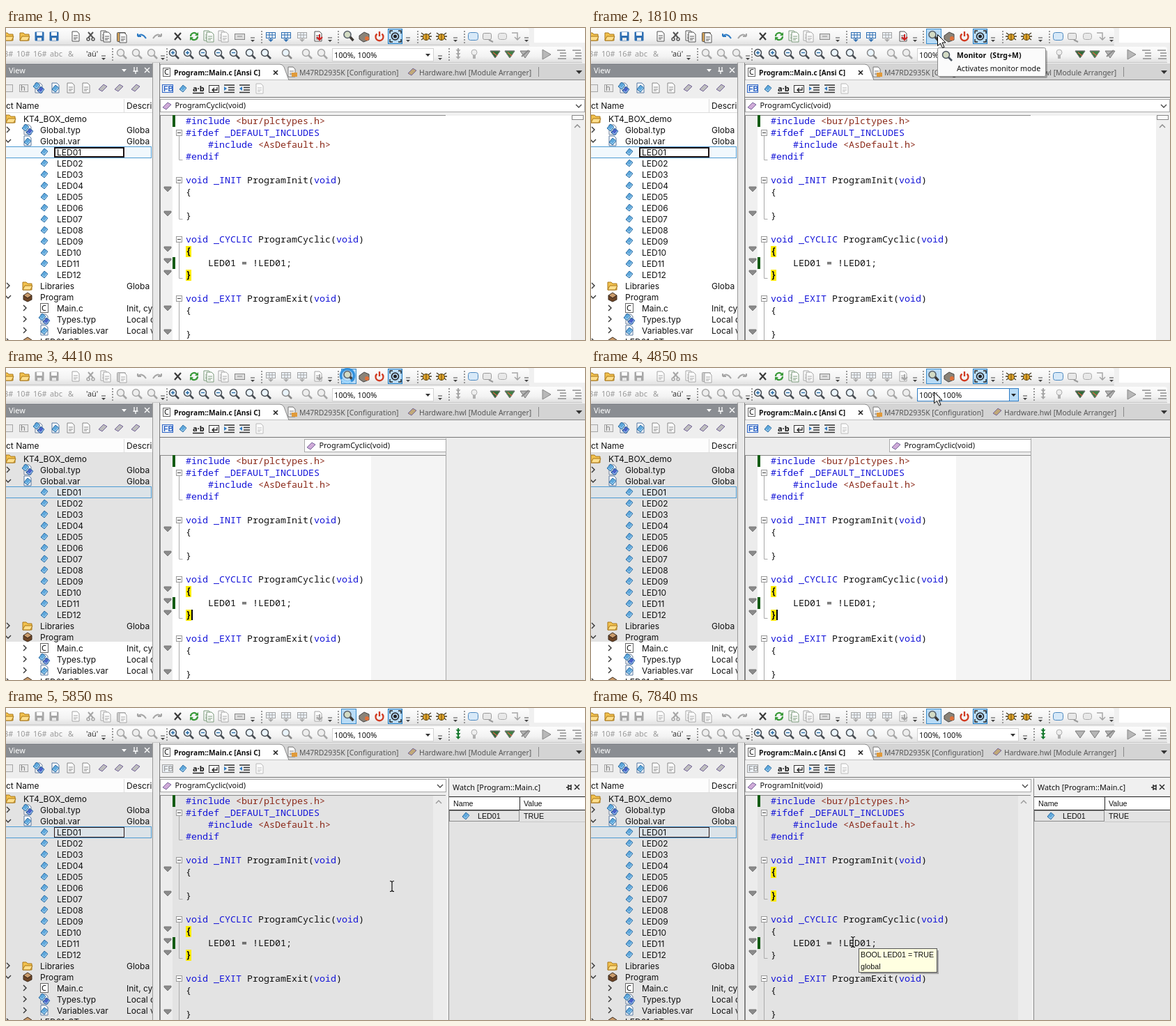
Animation, 831 px wide and 448 px high, one loop 8 s. Source, as an HTML page:

```html
<!DOCTYPE html>
<html lang="en">
<head>
<meta charset="utf-8">
<title>Monitor mode</title>
<style>
html, body { margin: 0; width: 100%; height: 100%; overflow: hidden; background: #f0f0f0; }
svg { display: block; }
text { white-space: pre; fill: #111; }
.ui { font: 10.9px "Noto Sans", sans-serif; }
.tab { font: 10.4px "Noto Sans", sans-serif; }
.tree { font: 12px Inter, sans-serif; }
.code { font: 13.33px "Noto Sans Mono", monospace; }
.sys { font: 10.7px "Liberation Sans", Arial, sans-serif; }
.bold { font-weight: 700; }
</style>
</head>
<body>
<script>
const T = 8000, NS = 'http://www.w3.org/2000/svg';
const BLUE = '#2f7cc4', DARK = '#444', GREY = '#a6a6a6', DIM = '#e3e3e3', SEL = '#b9dcf7';
let into = document.body;

function add(tag, attrs) {
  const n = document.createElementNS(NS, tag);
  for (const k in attrs) n.setAttribute(k, attrs[k]);
  return into.appendChild(n);
}
function group(fn, attrs = {}) {
  const g = add('g', attrs), keep = into;
  into = g; fn(); into = keep;
  return g;
}
const rect = (x, y, width, height, fill, stroke = 'none', rx = 0) =>
  add('rect', { x, y, width, height, fill, stroke, rx });
const box = (x, y, w, h, fill, stroke, rx) => rect(x + .5, y + .5, w - 1, h - 1, fill, stroke, rx);
const path = (d, fill, stroke = 'none', w = 1) => add('path', { d, fill, stroke, 'stroke-width': w });
const line = (d, c, w = 1) => path(d, 'none', c, w);
const disc = (cx, cy, r, fill, stroke = 'none', w = 1) =>
  add('circle', { cx, cy, r, fill, stroke, 'stroke-width': w });
function text(x, y, s, cls = 'ui', fill) {
  const n = add('text', { x, y, class: cls });
  if (fill) n.style.fill = fill;
  n.textContent = s;
  return n;
}

// Visible between each pair of times.
function on(node, ...times) {
  const k = [{ offset: 0, opacity: times[0] ? 0 : 1 }];
  times.forEach((t, i) => { if (t > 0 && t < T) k.push({ offset: t / T, opacity: i % 2 ? 0 : 1 }); });
  k.push({ offset: 1, opacity: k[k.length - 1].opacity });
  k.forEach(f => f.easing = 'step-end');
  play(node, k);
}
const play = (node, frames, duration = T) => node.animate(frames, { duration, iterations: Infinity });
const during = (times, fn) => on(group(fn), ...times);
const EDIT = [0, 3800], RUN = [3800, T], WIDE = [0, 4150], NARROW = [4150, T];
const MOVING = [4150, 5000], SETTLED = [5000, T];

// Small icons, centred on x, y.
const icon = {
  mag(x, y, c = DARK, lens = '#eaf4fc') {
    disc(x - 1.5, y - 1.5, 5, lens, c, 1.5);
    line(`M${x + 2} ${y + 2}l5 5`, c, 2.6);
  },
  folder(x, y) {
    path(`M${x - 7} ${y - 5}h5l2 2h6v9h-13z`, '#f2c14e', '#a87718');
    path(`M${x - 7} ${y + 6}l3-6h11l-3 6z`, '#ffdf8c', '#a87718');
  },
  disk(x, y, c) {
    box(x - 7, y - 7, 14, 14, c, 'none', 1);
    rect(x - 4, y - 6, 8, 5, '#fff');
    rect(x - 3, y + 2, 6, 4, '#e8e8e8');
  },
  doc(x, y, c = '#777', mark) {
    path(`M${x - 5} ${y - 7}h7l3 3v11h-10z`, '#fcfcfc', c);
    line(`M${x - 3} ${y - 1}h6m-6 3h6m-6 2h4`, mark || c);
  },
  copy(x, y, c) { icon.doc(x - 2, y - 1, c); icon.doc(x + 2, y + 1, c); },
  grid(x, y, c) {
    box(x - 7, y - 6, 14, 9, '#eef4fa', c);
    line(`M${x - 7} ${y - 2}h14m-9-4v9m4-9v9`, c);
    line(`M${x} ${y + 2}v5m-3-3l3 3 3-3`, c, 1.5);
  },
  undo(x, y, c, dir = 1) {
    line(`M${x - 6 * dir} ${y}q${6 * dir}-6 ${12 * dir} 3m${-12 * dir}-3v-4m0 4h${5 * dir}`, c, 2);
  },
  refresh(x, y, c) {
    line(`M${x - 5} ${y}a5 5 0 0 1 9-3m1 3a5 5 0 0 1-9 3`, c, 2.2);
    path(`M${x + 6} ${y - 6}v5h-5zM${x - 6} ${y + 6}v-5h5z`, c);
  },
  bug(x, y) {
    line(`M${x - 7} ${y - 5}l14 10m-14 0l14-10m-15 5h16`, '#443a20', 1.3);
    disc(x, y + 1, 4.6, '#dfa32b', '#5d4512');
    line(`M${x} ${y - 3}v9`, '#5d4512');
  },
  gem(x, y, c = '#5fa8dc') {
    path(`M${x - 5} ${y + 1}l5-6 5 4-5 6z`, c, '#2b6ca3');
    line(`M${x - 3} ${y + 1}l3 2.500 4-5`, '#b4dcf6');
  },
  more(x, y) {
    line(`M${x - 3} ${y - 2}h6`, DARK);
    path(`M${x - 3} ${y + 1}h6l-3 3z`, DARK);
  },
  grip(x, y) { add('path', { d: `M${x} ${y - 8}v18`, stroke: '#999', 'stroke-width': 2, 'stroke-dasharray': '2 2' }); },
  tri(x, y, c) { path(`M${x - 7} ${y - 5}h14l-7 10z`, c, '#777'); },
  cube(x, y) {
    path(`M${x - 6} ${y - 2}l6-4 6 4-6 4z`, '#c89a6a', '#3b2a1c');
    path(`M${x - 6} ${y - 2}v6l6 3 6-3v-6l-6 4z`, '#6d4526', '#3b2a1c');
  },
  types(x, y) {
    icon.doc(x, y, '#6a7c98');
    icon.gem(x - 3, y - 3); icon.gem(x + 3, y + 3, '#4a62c8');
  },
  vars(x, y) { icon.doc(x, y, '#5577a0'); icon.gem(x, y + 1); },
  pen(x, y, c) { path(`M${x - 6} ${y + 2}l7-7 5 3-7 7z`, c, '#75659a'); }
};

function toolbars() {
  rect(0, 0, 831, 50, '#f0f0f0');
  rect(758, 0, 73, 21, '#fff');
  [[0, 0, 755, 25], [0, 27, 831, 23]].forEach(([x, y, w, h]) => {
    rect(x - 4, y, w, h, 'url(#bar)', 'none', 4);
    line(`M${x} ${y + h - .5}h${w - 4}`, '#c6c6c6');
  });
  [367, 477, 591, 658].forEach(x => icon.grip(x, 12));
  [153, 231, 636].forEach(x => icon.grip(x, 37));
  [354, 465, 577, 645, 747].forEach(x => icon.more(x, 16));
  [140, 225, 623].forEach(x => icon.more(x, 42));

  icon.folder(4, 12); icon.folder(27, 12);
  const editIcons = live => {
    const c = live ? '#2f6fb2' : GREY, d = live ? '#555' : GREY;
    icon.disk(48, 12, c); icon.disk(69, 12, c);
    icon.doc(100, 12, d);
    line('M118 6l7 8m0-8l-7 8', d, 2); disc(118, 16, 2, 'none', d, 1.5); disc(125, 16, 2, 'none', d, 1.5);
    icon.copy(143, 12, d);
    box(159, 6, 13, 14, live ? '#d6a45a' : '#ccc', d, 1); icon.doc(168, 14, d);
    icon.undo(195, 12, live ? BLUE : GREY);
    [380, 402].forEach(x => icon.grid(x, 12, c));
    icon.grid(425, 12, GREY);
    icon.doc(448, 12, d); line('M450 9v8m-4-4l4 4 4-4', live ? '#c22' : GREY, 2);
  };
  during(EDIT, () => editIcons(true));
  during(RUN, () => editIcons(false));
  icon.undo(217, 12, GREY, -1);
  line('M242 7l9 10m0-10l-9 10', '#3a3a3a', 2.2);
  icon.refresh(270, 12, '#3a9a3a');
  icon.copy(291, 12, '#7a9a7a'); icon.copy(312, 12, GREY);
  box(328, 8, 15, 9, '#ddd', '#888'); line('M332 12h7', '#888');

  on(box(481, 1, 22, 22, SEL, '#3a8ccc'), 1150, T);
  disc(490, 9.5, 5, '#d3dbc4', '#59616b', 1.6); line('M494 13l4.500 5', '#3f3a36', 3.4);
  path('M507 11l7-5 7 3v8l-8 3-6-4z', '#8a8378', '#444'); disc(518, 15, 3, '#e0703a');
  line('M532.5 8.5a5.5 5.5 0 1 0 7 0M536 5v7', '#d03a20', 2.3);
  box(548, 1, 21, 22, SEL, '#1b78c2');
  disc(558.5, 12, 5, 'none', '#222', 1.5); disc(558.5, 12, 2.5, '#222');
  line('M551 8v-4h4m8 0h4v4m0 8v4h-4m-8 0h-4v-4', '#222', 1.4);
  icon.bug(603, 12); icon.bug(625, 12);
  box(663, 6, 15, 12, '#d7e9f8', '#4b88c0', 3);
  box(684, 7, 13, 10, '#e8e8e8', '#999', 2); line('M693 17l6 3', '#999', 2);
  box(706, 7, 13, 10, '#e8e8e8', '#aaa', 3); line('M726 7h8v9m-4-3l4 4 4-4', GREY, 1.5);

  [[-3, '8#'], [15, '10#'], [39, '16#'], [63, 'abc'], [89, '&']].forEach(([x, s]) => text(x, 41, s, 'ui', '#999'));
  text(115, 41, "'aü'", 'ui', '#333');
  [166, 188, 210, 432, 454].forEach(x => icon.mag(x, 37, GREY, '#eee'));
  [241, 262, 284, 306, 328, 351, 373, 403].forEach((x, i) => {
    icon.mag(x, 37, i == 7 ? '#888' : '#474c52');
    if (i < 2) line(`M${x - 4} 35.5h5m-2.5-2.5v5`, '#2468a4', 1.3);
    else if (i < 5) line(`M${x - 4} 35.5h5`, '#2468a4', 1.3);
  });
  box(468, 29, 146, 19, '#fff', '#d2d2d2');
  path('M602 37h7l-3.500 4z', '#333');
  during([880, 970, 4720, 5020], () => {
    box(468, 29, 146, 19, 'none', BLUE); box(600, 29, 14, 19, SEL, BLUE);
    path('M603 37h7l-3.500 4z', '#222');
  });
  text(471, 43, '100%, 100%');

  const signal = c => [32, 37, 42].forEach(y => path(`M645.500 ${y - 1}h7l-3.500 4zM648 ${y - 3}h2v2h-2z`, c));
  on(group(() => signal('#a8a8a8')), 0, 5200);
  on(group(() => signal('#187a30')), 5200, T);
  disc(672, 35, 4, '#eee', '#b0b0b0'); rect(670, 39, 4, 5, '#b0b0b0');
  [702, 723, 745].forEach(x => icon.tri(x, 38, '#b5b5b5'));
  during([0, 6000], () => { icon.tri(702, 38, '#2f6b35'); icon.tri(723, 38, '#3f8242'); line('M699 35l6 5m15-5l6 5', '#d8604a', 1.5); });
  line('M740 41l10-9', '#888', 2);
  path('M770 31l12 7-12 7z', '#b8b8b8', '#888');
  [798, 820].forEach(x => line(`M${x - 7} 32h12m-8 4h9m-9 4h9m-12 4h12`, '#8d8d8d', 1.4));
}

function treeRow(i, x, name, glyph, fold, desc) {
  const y = 130 + 16 * i;
  if (fold) {
    const fx = x > 60 ? 27 : 3;
    line(fold == '>' ? `M${fx - 2} ${y - 4}l4 4-4 4` : `M${fx - 4} ${y - 2}l4 4 4-4`, '#333', 1.4);
  }
  if (glyph) glyph(x - 18, y);
  text(x, y + 4.500, name, 'tree');
  if (desc) text(173, y + 4.500, desc, 'tree');
}

function treePanel() {
  rect(0, 50, 210, 398, '#fff');
  rect(0, 51, 210, 20, '#8a8d92');
  text(4, 65, 'View', 'ui', '#fff');
  path('M166 59h7l-3.500 4z', '#fff');
  line('M184 56v6m4-6v6m-5.500 0h7m-3.500 0v4m13-9l7 7m0-7l-7 7', '#fff', 1.3);
  rect(0, 71, 210, 30, '#eee');
  [3, 25].forEach(x => box(x - 6, 81, 13, 11, '#eaeaea', GREY));
  text(21, 90, 'h', 'ui', '#777');
  icon.types(47, 86); icon.vars(71, 86);
  [93, 115].forEach(x => icon.doc(x, 86, '#888'));
  [139, 162, 186].forEach(x => icon.pen(x, 86, '#bdbdbd'));
  on(rect(0, 122, 210, 271, DIM), ...RUN);
  on(rect(0, 393, 210, 55, DIM), ...SETTLED);
  rect(0, 101, 210, 21, '#fdfdfd');
  line('M0 121.500h210M169.500 102v19', '#ddd');
  text(0, 116, 'ct Name', 'tree'); text(173, 116, 'Descri', 'tree');

  box(-2, 170, 211, 17, 'rgba(200,228,248,.25)', '#4d9bd3');
  on(box(69, 171, 101, 15, 'none', '#2a1414'), 0, 4150, 5120, T);
  during(EDIT, () => box(70, 172, 99, 13, '#fff', '#111'));

  treeRow(0, 25, 'KT4_BOX_demo', icon.folder);
  treeRow(1, 49, 'Global.typ', icon.types, '>', 'Globa');
  treeRow(2, 49, 'Global.var', icon.vars, 'v', 'Globa');
  for (let n = 1; n < 13; n++) treeRow(n + 2, 73, 'LED' + String(n).padStart(2, 0), icon.gem);
  treeRow(15, 49, 'Libraries', icon.folder, '>', 'Globa');
  treeRow(16, 49, 'Program', icon.cube, 'v');
  treeRow(17, 73, 'Main.c', (x, y) => { box(x - 6, y - 7, 12, 14, '#fff', '#666'); text(x - 4, y + 4, 'C'); }, '>', 'Init, cy');
  treeRow(18, 73, 'Types.typ', icon.types, '>', 'Local d');
  treeRow(19, 73, 'Variables.var', icon.vars, '>', 'Local v');
  treeRow(20, 49, 'LED01_ST', icon.cube, '>');
}

function tabs() {
  rect(210, 50, 621, 398, '#f0f0f0');
  rect(211, 50, 8, 398, '#e8e8e8');
  line('M210.500 50v398', '#999');
  line('M220.500 50v398', '#777');
  rect(221, 51, 610, 23, '#d4d4d4');
  line('M221 74.500h610', '#8a8a8a');
  path('M221 75v-21q0-2 2-2h170q4 0 6 4l7 19z', '#fff', '#8a8a8a');
  box(225, 57, 11, 13, '#fff', '#666'); text(227, 67, 'C');
  text(241, 68, 'Program::Main.c [Ansi C]', 'ui bold').style.fontSize = '10.2px';
  line('M384 61l6 6m0-6l-6 6', '#222', 1.6);
  icon.doc(410, 63, '#777'); rect(410, 64, 8, 6, '#e09a3a');
  text(421, 68, 'M47RD2935K [Configuration]', 'tab', '#555');
  icon.pen(583, 63, '#c0a878');
  text(593, 68, 'Hardware.hwl [Module Arranger]', 'tab', '#555');
  line('M764.500 56v14', '#888');
  path('M818 61h9l-4.500 5z', '#333');
  rect(221, 75, 610, 24, '#f0f0f0');

  const fb = c => { box(224, 81, 16, 12, '#eef4fb', c); text(226, 91, 'FB', 'sys bold', c); };
  on(group(() => fb('#2b62c4')), 0, 5100);
  on(group(() => fb('#a0a0a0')), 5100, T);
  icon.gem(254, 87);
  text(268, 91, 'a·b', 'ui bold'); line('M268 93.500h16', '#222', 1.5);
  box(291, 82, 15, 11, '#fff', '#333'); line('M303 85v4h-7m3-3l-3 3 3 3', '#222', 1.3);
  [320, 342].forEach((x, i) => {
    line(`M${x - 7} 82h15m-9 3.500h9m-9 3.500h9m-15 3.500h15`, '#333', 1.4);
    path(i ? `M${x - 3} 84v6l-4-3z` : `M${x - 7} 84v6l4-3z`, BLUE);
  });
  icon.doc(364, 87, '#bbb');
}

function combo(x, right, name, arrow = true) {
  box(x, 102, right - x, 19, '#fff', '#a8a8a8');
  icon.pen(x + 10, 112, '#cfaad8');
  text(x + 21.500, 115, name);
  if (arrow) line(`M${right - 13} 110l4 4 4-4`, '#444', 1.3);
}

const rowY = i => 133 + 17 * i;
function code(i, ...parts) {
  const t = text(258, rowY(i) + 5, '', 'code');
  parts.forEach((s, n) => {
    const span = document.createElementNS(NS, 'tspan');
    span.textContent = s;
    span.style.fill = ['#1414d8', '#8b2a1a', '#111'][n];
    t.appendChild(span);
  });
}
function braces(...rows) {
  rows.forEach((i, n) => {
    rect(258, rowY(i) - 7, 8, 16, '#ffec00');
    text(258, rowY(i) + 5, n ? '}' : '{', 'code bold');
  });
}
const upArrow = x => line(`M${x - 4} 137l4-4 4 4`, '#999', 1.4);

function editor() {
  rect(222, 126, 17, 322, '#f0f0f0');
  during(WIDE, () => {
    combo(221, 831, 'ProgramCyclic(void)');
    rect(239, 126, 572, 322, '#fff');
    rect(811, 126, 19, 322, '#f0f0f0');
    box(812, 125, 17, 7, '#fafafa', '#888');
    line('M816 143l4-4 4 4', '#888', 1.4);
  });
  on(box(221, 102, 610, 19, 'none', BLUE), 640, 700);
  during(NARROW, () => rect(221, 99, 610, 349, '#ececec'));
  // The old picture stays in part until the layout settles.
  during(MOVING, () => {
    rect(239, 126, 285, 322, '#fff');
    rect(524, 126, 107, 322, '#f4f4f4');
    line('M631.500 101v347', '#aaa');
    combo(428, 632, 'ProgramCyclic(void)', false);
  });
  during(SETTLED, () => {
    rect(239, 126, 374, 322, DIM);
    rect(613, 126, 18, 322, '#ececec');
  });
  during([5000, 5960], () => combo(221, 632, 'ProgramCyclic(void)'));
  during([5960, T], () => combo(221, 632, 'ProgramInit(void)'));
  line('M221 99.500h610', '#777');
  line('M221 125.500h410M221.500 126v322', '#8a8a8a');
  [0, 12].forEach(i => rect(239, rowY(i) - 8, 4, 17, '#145c14'));

  [[1, 3], [5, 8], [10, 13], [15, 19]].forEach(([a, b]) => {
    line(`M248.500 ${rowY(a) + 5}V${rowY(b) + 5.500}h5`, '#aaa');
    box(244, rowY(a) - 4, 9, 9, '#fff', '#999');
    line(`M246 ${rowY(a) + .5}h5`, '#444');
  });
  [231, 266, 317, 334, 351, 402, 436].forEach(y => path(`M227 ${y - 3}h10v2l-5 5-5-5z`, '#8b8b8b', '#6d6d6d', .8));

  code(0, '#include ', '<bur/plctypes.h>');
  code(1, '#ifdef _DEFAULT_INCLUDES');
  code(2, '    #include ', '<AsDefault.h>');
  code(3, '#endif');
  ['Init', 'Cyclic', 'Exit'].forEach((name, n) => {
    const i = [5, 10, 15][n];
    code(i, `void _${name.toUpperCase()} `, '', `Program${name}(`);
    const s = into.lastChild.appendChild(document.createElementNS(NS, 'tspan'));
    s.textContent = 'void'; s.style.fill = '#1414d8';
    into.lastChild.append(')');
    code(i + 1, '', '', '{');
    code(i + 3, '', '', '}');
  });
  code(12, '', '', '    LED01 = !LED01;');
  during([0, 5960], () => braces(11, 13));
  during([5960, T], () => braces(6, 8));
  on(rect(266, 347, 2, 15, '#000'), 2600, 5500);
  on(rect(258, 245, 2, 15, '#000'), 5960, 6600, 7130, 7670);
}

const HIGH = [5000, 6100, 6530, 7400, 7830, T], LOW = [6100, 6530, 7400, 7830];
function watch() {
  during(SETTLED, () => {
    upArrow(621);
    rect(632, 100, 199, 348, '#f0f0f0');
    rect(636, 126, 195, 322, DIM);
    line('M635.500 101v347', '#888');
    text(641, 118, 'Watch [Program::Main.c]');
    line('M804 114h3m0-4v8m0-6h4m-4 4h4m0-6v8m5-8l7 7m0-7l-7 7', '#222', 1.4);
    rect(636, 128, 195, 18, '#fff');
    line('M636 127.500h195M636 146.500h195M737.500 128v18', '#222');
    text(642, 141, 'Name', 'sys'); text(743, 141, 'Value', 'sys');
    add('rect', { x: 636.5, y: 147.5, width: 100, height: 15, fill: 'none', stroke: '#333', 'stroke-dasharray': '1 1' });
    line('M737 163.500h94', '#c8c8c8');
    icon.gem(660, 155);
    text(677, 159, 'LED01', 'sys');
  });
  on(text(743, 159, 'TRUE', 'sys'), ...HIGH);
  on(text(743, 159, 'FALSE', 'sys'), ...LOW);
}

function hints() {
  const tip = group(() => {
    rect(500, 32, 155, 40, 'rgba(0,0,0,.25)', 'none', 2);
    box(497, 28, 156, 42, '#fbfbfb', '#8a8a8a', 2);
    icon.mag(511, 40, '#4b5560', '#d3dbc4');
    text(525, 43, 'Monitor  (Strg+M)', 'ui bold').style.fontSize = '10.5px';
    text(525, 62, 'Activates monitor mode').style.fontSize = '10.7px';
  });
  play(tip, [[0, 0], [1630, 0], [1790, 1], [2480, 1], [2640, 0], [T, 0]]
    .map(([t, opacity]) => ({ offset: t / T, opacity })));
  during([7400, T], () => {
    rect(387, 348, 112, 34, 'rgba(0,0,0,.28)');
    box(384, 345, 113, 35, '#ffffe1', '#555');
    text(387, 358, 'BOOL LED01 = ', 'sys'); text(387, 375, 'global', 'sys');
    on(text(463, 358, 'TRUE', 'sys'), 7830, T);
    on(text(463, 358, 'FALSE', 'sys'), 7400, 7830);
  });
}

function pointer() {
  const spin = group(() => {
    disc(0, 0, 9.5, 'none', '#2f8fdc', 3.500);
    line('M0-9.500a9.500 9.500 0 0 1 9.500 9.500', '#a8dcff', 3);
  });
  play(spin, [{ transform: 'translate(490px,11px) rotate(0deg)' }, { transform: 'translate(490px,11px) rotate(360deg)' }], 1000);
  const busy = add('g', {});
  busy.append(spin);
  on(busy, 2620, 4590);

  const move = group(() => {
    on(path('M.5.5v16l4-3.500 3 6.500 2.500-1-3-6.500h5z', '#fff', '#000'), 560, 2620, 4590, 5330);
    on(line('M-3-7.500q3 0 3 2 0-2 3-2M0-6V6M-3 7.500q3 0 3-2 0 2 3 2', '#111', 1.2), 100, 560, 5330, T);
  });
  const stops = [
    [0, 562, 470], [100, 560, 458], [400, 540, 240], [650, 515, 106], [890, 499, 30], [1030, 497, 24],
    [1240, 497, 9], [2010, 497, 9], [2170, 488, 8], [4590, 488, 8], [4850, 492, 34], [5330, 522, 126],
    [5650, 554, 256], [6000, 554, 256], [6650, 400, 332], [7050, 376, 336], [T, 376, 336]
  ];
  play(move, stops.map(([t, x, y]) => ({ offset: t / T, transform: `translate(${x}px,${y}px)` })));
}

into = add('svg', { width: 831, height: 448, viewBox: '0 0 831 448' });
const bar = add('linearGradient', { id: 'bar', x2: 0, y2: 1 });
[['0', '#fdfdfd'], ['.6', '#f3f3f3'], ['1', '#dedede']].forEach(([offset, color]) =>
  bar.append(add('stop', { offset, 'stop-color': color })));
[treePanel, tabs, toolbars, editor, watch, hints, pointer].forEach(draw => draw());
</script>
</body>
</html>
```
